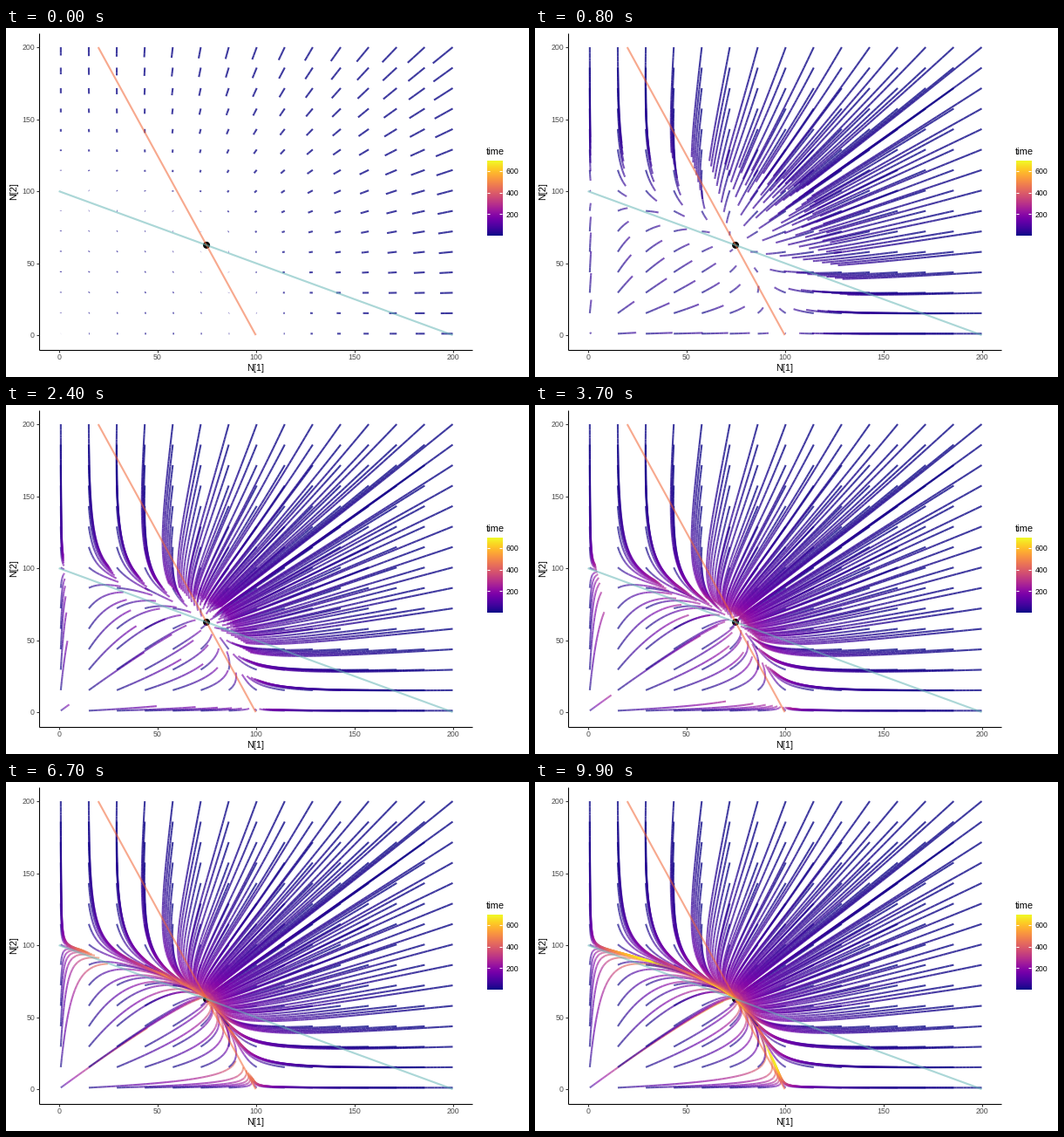
Recreate the animation shown at these times as a matplotlib script. Size 600 px wide and 400 px high, loop 10 s.

```python
import numpy as np
import matplotlib.pyplot as plt
from matplotlib import colormaps
from matplotlib.animation import FuncAnimation
from matplotlib.collections import LineCollection
from matplotlib.patches import Circle

W, H, FRAMES, T_MAX = 600, 400, 100, 700
GROWTH = 0.01
CHUNK = 5.0  # px per drawn piece of a slow trajectory
plasma = colormaps["plasma"]

plt.rcParams["font.family"] = "Liberation Sans"
fig = plt.figure(figsize=(W / 72, H / 72), dpi=72, facecolor="white")
ax = fig.add_axes([0, 0, 1, 1])
ax.axis("off")


def px(n1):
    return 60.6 + 2.2595 * n1


def py(n2):
    return 352 - 1.65 * n2


def velocity(n):
    n1, n2 = n
    return GROWTH * np.array([n1 * (1 - (n1 + 0.4 * n2) / 100),
                              n2 * (1 - (n2 + 0.5 * n1) / 100)])


def simulate():
    """Pixel positions of all trajectories, shape (path, time, 2)."""
    starts = np.linspace(1, 200, 15)
    n = np.array([g.ravel() for g in np.meshgrid(starts, starts)])
    states = [n]
    for _ in range(T_MAX):
        a = velocity(n)
        b = velocity(n + a / 2)
        c = velocity(n + b / 2)
        d = velocity(n + c)
        n = n + (a + 2 * b + 2 * c + d) / 6
        states.append(n)
    s = np.array(states)
    return np.stack([px(s[:, 0]), py(s[:, 1])], axis=-1).transpose(1, 0, 2)


def split(pos):
    """Cut every trajectory into short pieces: path, first and last time, speed."""
    step = np.hypot(*np.diff(pos, axis=1).transpose(2, 0, 1))
    travelled = np.cumsum(step, axis=1) - step
    block = np.arange(T_MAX) // 70
    path, first, last, speed = [], [], [], []
    for k in range(len(pos)):
        key = np.floor(travelled[k] / CHUNK) * 1000 + block
        i0 = np.r_[0, np.nonzero(np.diff(key))[0] + 1]
        i1 = np.r_[i0[1:], T_MAX]
        path.append(np.full(len(i0), k))
        first.append(i0)
        last.append(i1)
        speed.append(np.add.reduceat(step[k], i0) / (i1 - i0))
    return [np.concatenate(v) for v in (path, first, last, speed)]


pos = simulate()
path, first, last, speed = split(pos)
colors = plasma((first + last - 1) / 2 / T_MAX)
# slow motion leaves a lighter stroke
colors[:, 3] = np.minimum(0.8, 0.58 + 0.25 * speed / (speed + 0.7))


def line(x, y, color, lw=1.07, **kw):
    ax.plot(x, y, color=color, lw=lw, solid_capstyle="butt", **kw)


def label(x, y, s, size=8.8, color="#4d4d4d", **kw):
    ax.text(x, y, s, fontsize=size, color=color, va="baseline", **kw)


# axes
line([38, 38], [5.5, 368.5], "black")
line([37.5, 535], [368.5, 368.5], "black")
for v in range(0, 201, 50):
    line([px(v)] * 2, [368.5, 371.5], "#333333")
    label(px(v), 380, str(v), ha="center")
    line([35, 38], [py(v)] * 2, "#333333")
    label(33, py(v) + 3.4, str(v), ha="right")
label(286.5, 393, "N[1]", 11, "black", ha="center")
ax.text(9.5, 187, "N[2]", fontsize=11, rotation=90, ha="center", va="center")

# colour legend
label(551, 145, "time", 11, "black")
ax.imshow(np.linspace(1, 0, 256)[:, None], cmap=plasma, aspect="auto",
          extent=(551.5, 569, 238, 152), interpolation="bilinear")
for v in (200, 400, 600):
    y = 238 - 86 * v / T_MAX
    line([551.5, 555], [y, y], "white")
    line([565.5, 569], [y, y], "white")
    label(574, y + 3.2, str(v), color="black")

# equilibrium, trajectories, isoclines
ax.add_patch(Circle((px(75), py(62.5)), 4, color="black", lw=0, zorder=3))
trails = LineCollection([], linewidths=2.1, capstyle="butt", zorder=4)
trails.set_snap(False)
ax.add_collection(trails, autolim=False)
line([px(20), px(100)], [py(200), py(0)], (242/255, 99/255, 50/255), 2.13,
     alpha=0.55, zorder=5)
line([px(0), px(200)], [py(100), py(0)], (102/255, 182/255, 182/255), 2.13,
     alpha=0.55, zorder=5)

ax.set_xlim(0, W)
ax.set_ylim(H, 0)


def update(i):
    t = min(T_MAX, int((i + 0.5) * T_MAX / (FRAMES - 1)))
    on = first < t
    k = path[on]
    ends = np.minimum(last[on], t)
    trails.set_segments(np.stack([pos[k, first[on]], pos[k, ends]], axis=1))
    trails.set_color(colors[on])
    return [trails]


anim = FuncAnimation(fig, update, frames=FRAMES, interval=100,
                     init_func=lambda: update(0), repeat=True, repeat_delay=0)
plt.show()
```
